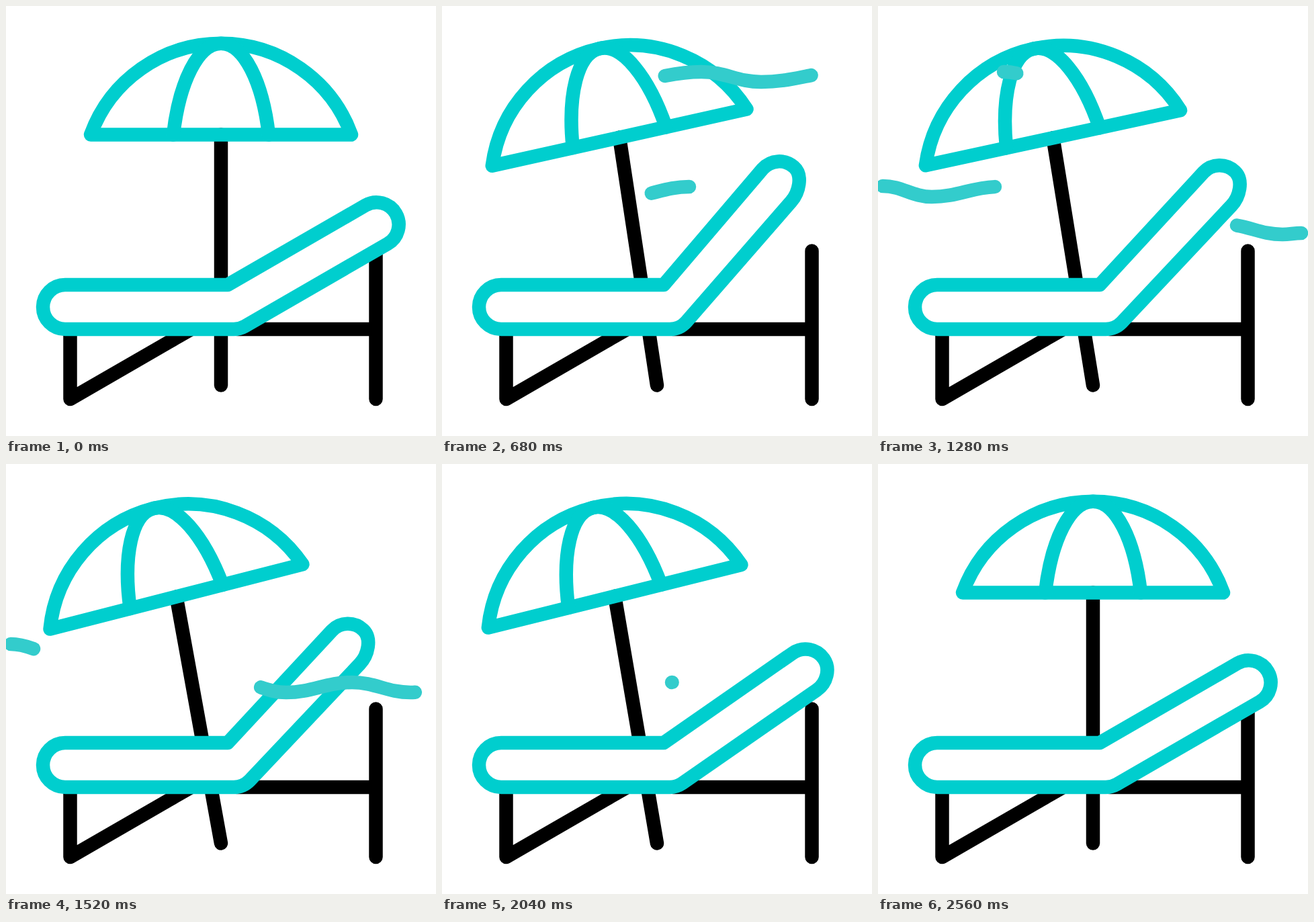
An HTML page for the animation above (2760 ms loop, 640 px wide and 640 px high).

```html
<!DOCTYPE html>
<html lang="en">
<head>
<meta charset="utf-8">
<title>Beach lounger in the wind</title>
<style>
  html, body { margin: 0; height: 100%; overflow: hidden; background: #fff; }
  svg { display: block; width: 100vw; height: 100vh; }
  path { fill: none; stroke: #000; stroke-width: 20.5; stroke-linecap: round; stroke-linejoin: round; }
  .teal path { stroke: #00cece; }
  .wind path { stroke: #33cccc; }
  #chair { fill: #fff; }
</style>
</head>
<body>
<svg viewBox="0 0 640 640">
  <path d="M95.5 481V585L275.6 481M345 481H550.5M550.5 364.5V585"/>
  <path id="pole" d="M320 191.5V564.5"/>
  <g class="teal"><path id="chair"/></g>
  <g id="canopy" class="teal">
    <path d="M126 191.5A206.5 206.5 0 0 1 514 191.5Z"/>
    <path d="M249 191.5C258 113 286 55.7 320 55.7S382 113 391 191.5"/>
  </g>
  <g id="wind" class="wind"></g>
</svg>
<script>
const LOOP = 2760, STEP = 40;
const $ = id => document.getElementById(id);
const clamp = u => Math.min(1, Math.max(0, u));
const smooth = u => u * u * (3 - 2 * u);
const ease = (t, start, duration) => smooth(clamp((t - start) / duration));

// Eased value through [time, value] keys
function track(t, keys) {
  let value = keys[0][1];
  for (let i = 1; i < keys.length; i++) {
    const [t0, v0] = keys[i - 1], [t1, v1] = keys[i];
    value += (v1 - v0) * ease(t, t0, t1 - t0);
  }
  return value;
}

// Keys alternating between high and low every 200 ms
const sway = (high, low) =>
  Array.from({ length: 7 }, (_, i) => [760 + 200 * i, i % 2 ? low : high]);

const poleKeys = [...sway(10.48, 8.48), [2440, 0]];
const tiltKeys = [[320, 0], ...sway(4.29, 2.34), [2120, 4.2], [2440, 0]];
const chairKeys = [[200, 30], [760, 49.5], [1360, 46.2], [1820, 46.2],
                   [2160, 30], [2360, 35], [2560, 30]];

// Wavy line through its crests and troughs
function wavePath(points) {
  return points.map(([x, y], i) => {
    if (!i) return `M${x} ${y}`;
    const [px, py] = points[i - 1], k = (x - px) * 0.4;
    return `C${px + k} ${py} ${x - k} ${y} ${x} ${y}`;
  }).join("");
}

const gusts = [
  { points: [[600, 98], [475, 113], [386, 98], [262, 113], [187, 98]], head: [200, 800], tail: [480, 920] },
  { points: [[368, 269], [272, 284], [180, 269], [80, 284], [7, 268]], head: [480, 800], tail: [840, 840] },
  { points: [[630, 338], [602, 340], [515, 325], [417, 340], [342, 325]], head: [1040, 620], tail: [1414, 643] }
];
for (const gust of gusts) {
  gust.path = document.createElementNS("http://www.w3.org/2000/svg", "path");
  gust.path.setAttribute("d", wavePath(gust.points));
  gust.path.setAttribute("pathLength", 1);
  $("wind").append(gust.path);
}

function chairPath(degrees) {
  const a = degrees * Math.PI / 180, c = Math.cos(a), s = Math.sin(a);
  const bulge = (degrees - 30) / 18.4;
  // Point measured along and across the backrest
  const at = (along, across) =>
    `${339 + along * c + across * s} ${448 - along * s + across * c} `;
  const end = 245.5 - 8.5 * bulge, side = 33 - 2 * bulge;
  return `M88 481A33 33 0 0 1 88 415H330L${at(245.5, -33)}` +
    `A33 33 0 0 1 ${at(278.5, 0)}` +
    `C${at(278.5, 18.2)}${at(end + 18.2, side)}${at(end, side)}` +
    `L${at(0, 33)}A33 33 0 0 1 339 481Z`;
}

function draw(t) {
  const rise = 10.48 * clamp((t - 310) / 450);
  const lean = t < 760 ? rise : track(t, poleKeys);
  const swing = `rotate(${-lean} 320 564.5)`;
  $("pole").setAttribute("transform", swing);
  $("canopy").setAttribute("transform", `${swing} rotate(${-track(t, tiltKeys)} 320 191.5)`);
  $("chair").setAttribute("d", chairPath(track(t, chairKeys)));
  for (const { path, head, tail } of gusts) {
    const from = ease(t, ...tail), length = ease(t, ...head) - from;
    path.style.display = length > 0 ? "" : "none";
    path.style.strokeDasharray = `${length} 2`;
    path.style.strokeDashoffset = -from;
  }
}

const begin = performance.now();
function frame() {
  const elapsed = (performance.now() - begin) % LOOP;
  draw(Math.floor(elapsed / STEP) * STEP);
  requestAnimationFrame(frame);
}
frame();
</script>
</body>
</html>
```
